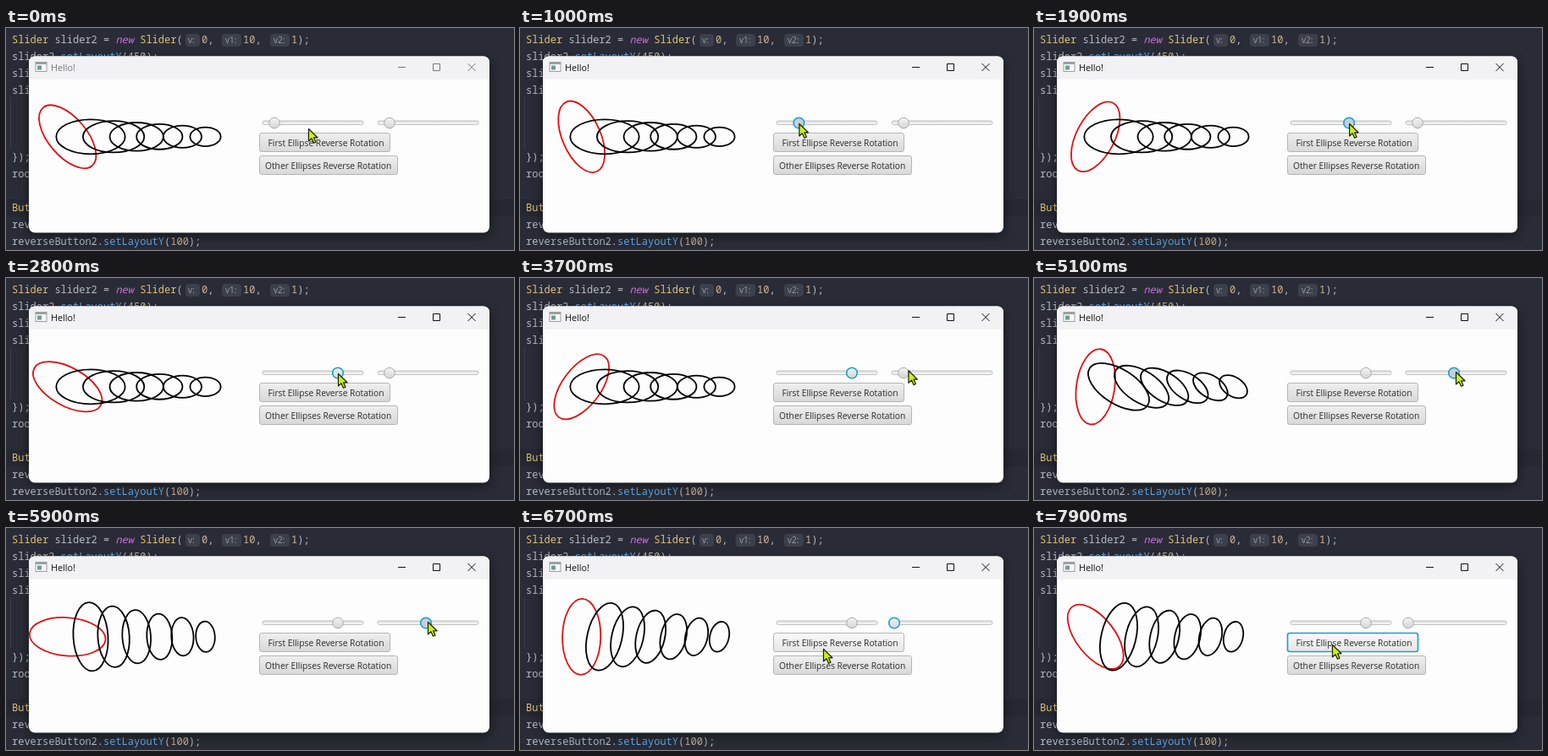
Write an HTML page that moves like this. It is 600x263 px and loops after 8000 ms.

```html
<!DOCTYPE html>
<html lang="en">
<head>
<meta charset="utf-8">
<title>Rotating ellipses</title>
<style>
html, body { margin: 0; width: 600px; height: 263px; overflow: hidden; background: #292c36; }
svg { display: block; }
text { white-space: pre; }
.code { font: 12px "Noto Sans Mono", "DejaVu Sans Mono", monospace; fill: #b4bac6; }
.type { fill: #e2c07c; }
.key { fill: #c66fd8; font-style: italic; }
.call { fill: #62a9e8; }
.num { fill: #cdb496; }
.hint rect { fill: #3c404a; }
.hint text { font: 10px "Open Sans", sans-serif; fill: #979ca8; }
.ui { font: 10.25px "Open Sans", "Noto Sans", sans-serif; fill: #2c2c2c; }
.title { font: 10.8px "Open Sans", "Noto Sans", sans-serif; }
#chrome { color: #111; fill: #111; }
#chrome.idle { color: #77777a; fill: #77777a; }
.ring { fill: none; stroke: #000; stroke-width: 1.8; }
.btn rect { fill: url(#face); stroke: #b5b5b5; }
.btn.hover rect { fill: url(#lit); }
.btn.focus rect { stroke: #169fd3; stroke-width: 1.6; }
.thumb { fill: url(#knob); stroke: #aaa; }
.thumb.focus { stroke: #169fd3; stroke-width: 1.6; }
.thumb.drag { fill: #c6cfd5; }
</style>
</head>
<body>
<svg width="600" height="263" viewBox="0 0 600 263">
  <defs>
    <linearGradient id="face" x2="0" y2="1"><stop stop-color="#efefef"/><stop offset="1" stop-color="#d8d8d8"/></linearGradient>
    <linearGradient id="lit" x2="0" y2="1"><stop stop-color="#fafafa"/><stop offset="1" stop-color="#e5e5e5"/></linearGradient>
    <linearGradient id="knob" x2="0" y2="1"><stop stop-color="#f4f4f4"/><stop offset="1" stop-color="#d5d5d5"/></linearGradient>
    <linearGradient id="groove" x2="0" y2="1"><stop stop-color="#dedede"/><stop offset="1" stop-color="#fafafa"/></linearGradient>
    <filter id="blur" x="-10%" y="-20%" width="120%" height="140%"><feGaussianBlur stdDeviation="7"/></filter>
  </defs>

  <rect width="600" height="263" fill="#292c36"/>
  <rect y="203" width="600" height="20" fill="#252831"/>
  <path d="M5.5 82V143" stroke="#3b3f4a"/>
  <g class="code">
    <text x="7" y="18"><tspan class="type">Slider</tspan> slider2 = <tspan class="key">new</tspan> <tspan class="type">Slider</tspan>(</text>
    <text x="231" y="18"><tspan class="num">0</tspan>,</text>
    <text x="280" y="18"><tspan class="num">10</tspan>,</text>
    <text x="337" y="18"><tspan class="num">1</tspan>);</text>
    <text x="7" y="38">slider2.<tspan class="call">setLayoutY</tspan>(<tspan class="num">450</tspan>);</text>
    <text x="7" y="58">sli</text>
    <text x="7" y="78">sli</text>
    <text x="7" y="157">});</text>
    <text x="7" y="177">roo</text>
    <text x="7" y="217" class="type">But</text>
    <text x="7" y="237">rev</text>
    <text x="7" y="257">reverseButton2.<tspan class="call">setLayoutY</tspan>(<tspan class="num">100</tspan>);</text>
  </g>
  <g class="hint">
    <rect x="212" y="7" width="17" height="15" rx="4"/><text x="215" y="18">v:</text>
    <rect x="255" y="7" width="23" height="15" rx="4"/><text x="259" y="18">v1:</text>
    <rect x="312" y="7" width="23" height="15" rx="4"/><text x="316" y="18">v2:</text>
  </g>

  <rect x="27" y="38" width="544" height="208" rx="8" opacity=".45" filter="url(#blur)"/>
  <rect x="27" y="33.5" width="544" height="209" rx="7" fill="#fdfdfe"/>
  <path d="M27 61V40.5a7 7 0 0 1 7-7H564a7 7 0 0 1 7 7V61z" fill="#f2f2f4"/>
  <rect x="35" y="40.5" width="13" height="11" fill="#f8f8f8" stroke="#9a9fa3"/>
  <path d="M35 42H48" stroke="#9a9fa3" stroke-width="2"/>
  <rect x="37" y="44.5" width="5" height="5" fill="#6f9f8c"/>
  <g id="chrome">
    <text class="title" x="53" y="50.5">Hello!</text>
    <path d="M463 46.5H472M504.5 42.5H512.5V50.5H504.5zM545.5 42L554.5 51M554.5 42L545.5 51" fill="none" stroke="currentColor"/>
  </g>

  <g id="rings"></g>

  <g fill="url(#groove)" stroke="#c0c0c0">
    <rect x="303" y="110" width="119" height="4.5" rx="2.2"/>
    <rect x="439" y="110" width="119" height="4.5" rx="2.2"/>
  </g>
  <circle class="thumb" id="thumb1" cy="112.5" r="6.3"/>
  <circle class="thumb" id="thumb2" cy="112.5" r="6.3"/>
  <g class="btn" id="btn"><rect x="299.5" y="124.5" width="154" height="22" rx="2.5"/><text class="ui" x="309.5" y="139.5">First Ellipse Reverse Rotation</text></g>
  <g class="btn"><rect x="299.5" y="151.5" width="163" height="22" rx="2.5"/><text class="ui" x="306" y="166.5">Other Ellipses Reverse Rotation</text></g>

  <path id="cursor" d="M.5 .5V15L4 11.8L6.5 17.3L9 16.2L6.6 10.8H11z" fill="#c8f01c" stroke="#1c2200" stroke-width="1.2" stroke-linejoin="round"/>
</svg>
<script>
const LOOP = 8000;
const GRAB1 = 740, DROP1 = 2320, GRAB2 = 4300, DROP2 = 6300, REVERSE = 7112;
const RATE = 13.75;      // degrees per second for each slider unit
const UNIT = 11;         // pixels per slider unit

// Pointer stops: time, x, y
const stops = [[0, 357, 119], [GRAB1, 317, 113], [DROP1, 392, 113], [2900, 392, 113], [3600, 459, 109],
  [GRAB2, 455, 111], [5100, 498, 111], [6000, 498, 111], [DROP2, 444, 112], [6700, 358, 143], [7000, 352, 138]];

const byId = id => document.getElementById(id);
const clamp = (v, lo, hi) => Math.min(hi, Math.max(lo, v));

function pointer(t) {
  const i = stops.findIndex(s => s[0] > t);
  if (i < 0) return stops.at(-1).slice(1);
  const [t0, x0, y0] = stops[i - 1], [t1, x1, y1] = stops[i];
  const p = (t - t0) / (t1 - t0);
  return [x0 + (x1 - x0) * p, y0 + (y1 - y0) * p];
}

// A thumb follows the pointer while it is held; its value sets the spin.
const thumb1 = t => pointer(clamp(t, GRAB1, DROP1))[0];
const thumb2 = t => pointer(clamp(t, GRAB2, DROP2))[0] - 2;
const redSpeed = t => (thumb1(t) - 305.5) / UNIT * RATE * (t < REVERSE ? 1 : -1);
const blackSpeed = t => t < GRAB2 ? 0 : (thumb2(t) - 442) / UNIT * RATE;

function turned(speed, t, step = 20) {
  let angle = 0;
  for (let s = 0; s < t; s += step) {
    const h = Math.min(step, t - s);
    angle += speed(s + h / 2) * h / 1000;
  }
  return angle;
}

function ring(cx, rx, ry, color = "#000") {
  const e = document.createElementNS("http://www.w3.org/2000/svg", "ellipse");
  const attrs = { class: "ring", cx, cy: 128.8, rx, ry };
  for (const k in attrs) e.setAttribute(k, attrs[k]);
  e.style.stroke = color;
  byId("rings").append(e);
  return angle => e.setAttribute("transform", `rotate(${angle} ${cx} 128.8)`);
}

const turnRed = ring(72.7, 45, 22.6, "#e01010");
const turnBlack = Array.from({ length: 6 }, (_, i) => ring(100 + 27.1 * i, 40.7 - 4.52 * i, 20.5 - 1.85 * i));

function draw(t) {
  const flag = (id, name, on) => byId(id).classList.toggle(name, on);
  const [x, y] = pointer(t);

  turnRed(50 + turned(redSpeed, t));
  const angle = turned(blackSpeed, t);
  turnBlack.forEach(turn => turn(angle));

  byId("thumb1").setAttribute("cx", thumb1(t));
  byId("thumb2").setAttribute("cx", thumb2(t));
  byId("cursor").setAttribute("transform", `translate(${x} ${y})`);

  flag("chrome", "idle", t < GRAB1);
  flag("thumb1", "focus", t >= GRAB1 && t < GRAB2);
  flag("thumb1", "drag", t >= GRAB1 && t < DROP1);
  flag("thumb2", "focus", t >= GRAB2 && t < REVERSE);
  flag("thumb2", "drag", t >= GRAB2 && t < DROP2);
  flag("btn", "focus", t >= REVERSE);
  flag("btn", "hover", x > 299 && x < 454 && y > 124 && y < 147);
}

const start = performance.now();
function tick() {
  draw((performance.now() - start) % LOOP);
  requestAnimationFrame(tick);
}
tick();
</script>
</body>
</html>
```
